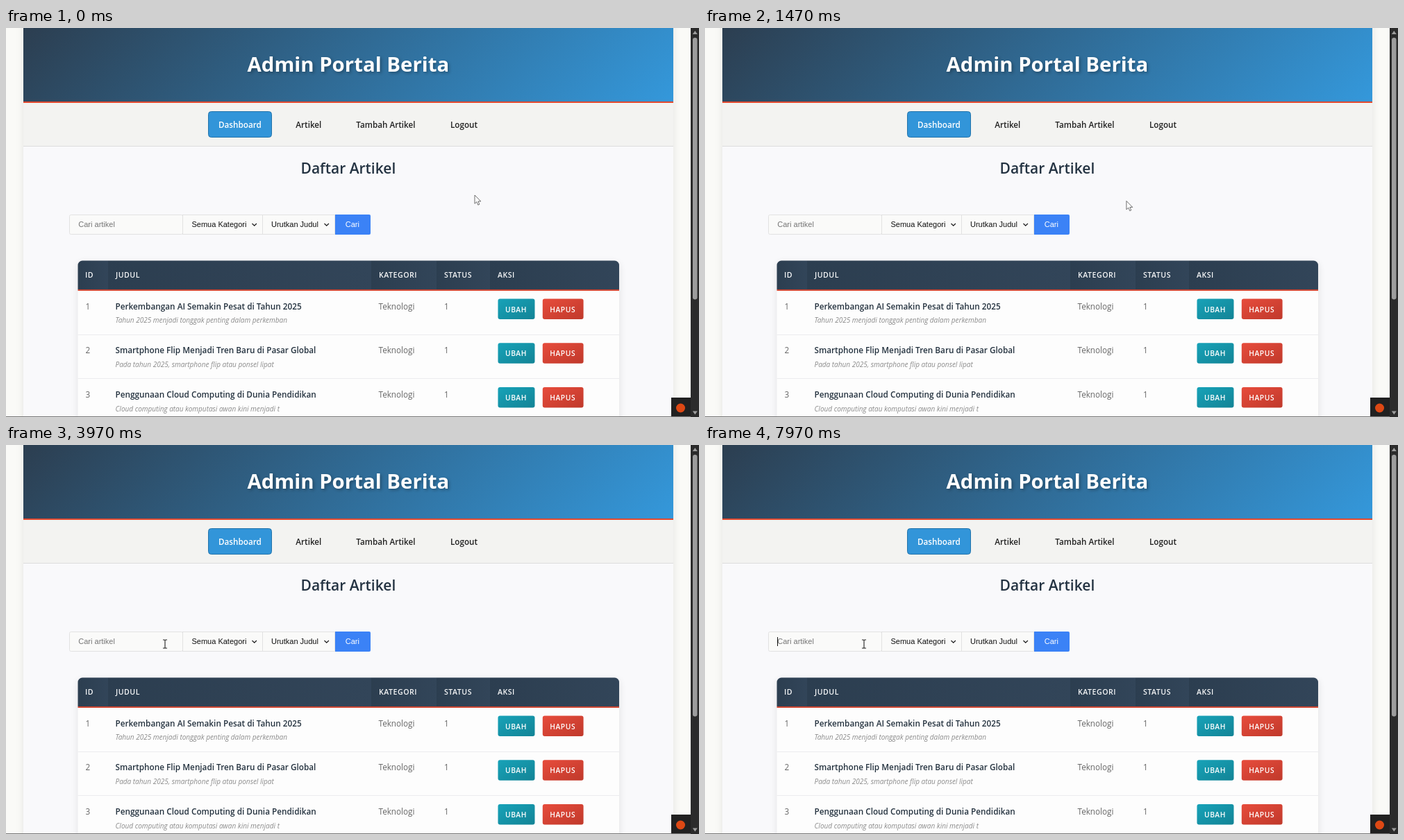
Write an HTML page that moves like this. It is 998 px wide and 561 px high and loops after 8 s.

```html
<!DOCTYPE html>
<html lang="id">
<head>
<meta charset="utf-8">
<title>Admin Portal Berita</title>
<style>
  html, body { margin: 0; height: 100%; overflow: hidden; background: #fafaf7; }
  svg { display: block; width: 100%; height: 100%; }
  text { font-family: "Open Sans", "Noto Sans", sans-serif; font-size: 11.7px; white-space: pre; }
  .brand { font-size: 29.4px; font-weight: 700; fill: #fff; text-shadow: 2px 2px 4px rgba(0,0,0,.3); }
  .heading { font-size: 21px; font-weight: 600; fill: #243342; }
  .nav { font-weight: 600; fill: #222; }
  .active { font-weight: 600; fill: #fff; }
  .th { font-size: 10.6px; font-weight: 600; letter-spacing: .5px; fill: #f6f7f8; }
  .cell { fill: #666; }
  .title { font-size: 11.77px; font-weight: 600; fill: #24323f; }
  .excerpt { font-size: 10px; font-style: italic; fill: #8b8b8b; }
  .btn { font-size: 10.3px; font-weight: 600; letter-spacing: .55px; fill: #fff; }
  .form { font: 11px "Liberation Sans", Arial, sans-serif; fill: #111; }
  .hint { fill: #757575; }
  .light { fill: #fff; }
</style>
</head>
<body>
<svg viewBox="0 0 998 561" preserveAspectRatio="none">
  <defs>
    <linearGradient id="banner" gradientUnits="userSpaceOnUse" x1="233" y1="-208" x2="753" y2="313">
      <stop stop-color="#2c3e50"/><stop offset="1" stop-color="#3498db"/>
    </linearGradient>
    <linearGradient id="head">
      <stop stop-color="#2c3e50"/><stop offset="1" stop-color="#324559"/>
    </linearGradient>
    <linearGradient id="teal" x2="1" y2="1">
      <stop stop-color="#17a2b8"/><stop offset="1" stop-color="#138496"/>
    </linearGradient>
    <linearGradient id="red" x2="1" y2="1">
      <stop stop-color="#e74c3c"/><stop offset="1" stop-color="#c0392b"/>
    </linearGradient>
    <filter id="soft" x="-10%" y="-10%" width="120%" height="120%"><feGaussianBlur stdDeviation="6"/></filter>
    <clipPath id="tableClip"><rect x="103.5" y="335.5" width="779.5" height="260" rx="6.5"/></clipPath>
  </defs>

  <rect width="998" height="561" fill="#fafaf7"/>
  <rect x="25" y="-20" width="936" height="620" opacity=".09" filter="url(#soft)"/>
  <rect x="25" width="936" height="561" fill="#f9f9fb"/>
  <rect x="25" width="936" height="106" fill="url(#banner)"/>
  <rect x="25" y="106" width="936" height="2" fill="#e2492f"/>
  <rect x="25" y="108" width="936" height="62" fill="#f3f3f1"/>
  <rect x="25" y="170" width="936" height="1" fill="#dcdcdc"/>
  <rect x="291.5" y="120.5" width="91" height="37" rx="4" fill="#3295d9" stroke="#2374ab"/>

  <g fill="#fafaf9" stroke="#e2e2e2">
    <rect x="91.5" y="269.5" width="163" height="28" rx="2"/>
    <rect x="254.5" y="269.5" width="115" height="28"/>
    <rect x="369.5" y="269.5" width="104" height="28"/>
  </g>
  <path d="M474 269H523a2 2 0 0 1 2 2v25a2 2 0 0 1-2 2H474z" fill="#3b82f6"/>
  <path d="M354.5 282l3.2 3.2 3.2-3.2M458.5 282l3.2 3.2 3.2-3.2" fill="none" stroke="#222" stroke-width="1.3"/>

  <rect x="104" y="339" width="779" height="260" rx="6" opacity=".1" filter="url(#soft)"/>
  <g id="table" clip-path="url(#tableClip)"></g>
  <g id="labels"></g>

  <rect x="958" y="533" width="28" height="28" fill="#212121"/>
  <circle cx="971.5" cy="548" r="6.5" fill="#dd4814"/>
  <rect x="986" width="12" height="561" fill="#2b2b2b"/>
  <rect x="989" y="14" width="6.5" height="377.5" rx="3.2" fill="#9d9d9d"/>
  <path d="M988.8 9l3.5-5 3.5 5zM988.8 552.5l3.5 5 3.5-5z" fill="#9d9d9d"/>
  <rect y="560" width="986" height="1" fill="#777"/>

  <rect id="caret" x="104" y="277" width="1" height="13" fill="#111"/>
  <path id="arrow" d="M0 0V12.3L2.8 9.7L4.8 14.2L6.8 13.3L4.9 9H8.8Z" fill="#fff" stroke="#4a4a4a" stroke-width=".8"/>
  <path id="beam" d="M-3-6H-1Q0-6 0-5Q0-6 1-6H3M0-5V5M-3 6H-1Q0 6 0 5Q0 6 1 6H3" fill="none" stroke="#222" stroke-width="1.1"/>
</svg>
<script>
const LOOP = 8000, BLINK = 530, CLICK = 3250;
const $ = id => document.getElementById(id);

function add(parent, tag, attrs, content = "") {
  const el = document.createElementNS("http://www.w3.org/2000/svg", tag);
  for (const name in attrs) el.setAttribute(name, attrs[name]);
  el.textContent = content;
  $(parent).append(el);
}
const box = (x, y, width, height, fill, rx = 0) => add("table", "rect", { x, y, width, height, fill, rx });
const label = (x, y, content, style) => add("labels", "text", { x, y, class: style }, content);

label(347.5, 63, "Admin Portal Berita", "brand");
label(306, 144.3, "Dashboard", "active");
label(417.3, 144.3, "Artikel", "nav");
label(504.3, 144.3, "Tambah Artikel", "nav");
label(640, 144.3, "Logout", "nav");
label(424.5, 209.5, "Daftar Artikel", "heading");
label(104.3, 287.4, "Cari artikel", "form hint");
label(267.5, 287.4, "Semua Kategori", "form");
label(382, 287.4, "Urutkan Judul", "form");
label(488.8, 287.4, "Cari", "form light");

box(103, 335, 781, 226, "#fdfdfd");
const columns = [["ID", 103], ["JUDUL", 147], ["KATEGORI", 526], ["STATUS", 620], ["AKSI", 697]];
columns.forEach(([name, x], i) => {
  const end = i < 4 ? columns[i + 1][1] : 884;
  box(x, 335, end - x, 42, "url(#head)");
  label(x + 11, 360.4, name, "th");
});
box(103, 377, 781, 2, "#cf4632");

[
  ["Perkembangan AI Semakin Pesat di Tahun 2025", "Tahun 2025 menjadi tonggak penting dalam perkemban"],
  ["Smartphone Flip Menjadi Tren Baru di Pasar Global", "Pada tahun 2025, smartphone flip atau ponsel lipat"],
  ["Penggunaan Cloud Computing di Dunia Pendidikan", "Cloud computing atau komputasi awan kini menjadi t"]
].forEach(([title, excerpt], i) => {
  const y = 378.5 + i * 63.7;
  box(103, Math.round(y + 63), 781, 1, "#ececee");
  box(708.5, y + 12, 53, 29.5, "url(#teal)", 3);
  box(772.8, y + 12, 58.8, 29.5, "url(#red)", 3);
  label(114.5, y + 27.2, i + 1, "cell");
  label(157.5, y + 27.2, title, "title");
  label(157.5, y + 46.8, excerpt, "excerpt");
  label(536.5, y + 27.2, "Teknologi", "cell");
  label(631, y + 27.2, "1", "cell");
  label(719, y + 31.2, "UBAH", "btn");
  label(783.2, y + 31.2, "HAPUS", "btn");
});

// Pointer stops: time, x, y
const stops = [[1250, 675, 241], [2100, 269, 291.5], [2250, 269, 291.5], [2750, 229, 287]];

function pointerAt(t) {
  const next = stops.findIndex(stop => stop[0] > t);
  if (next === 0) return stops[0].slice(1);
  if (next < 0) return stops[stops.length - 1].slice(1);
  const [t0, x0, y0] = stops[next - 1], [t1, x1, y1] = stops[next];
  const p = (t - t0) / (t1 - t0), e = p * p * (3 - 2 * p);
  return [x0 + (x1 - x0) * e, y0 + (y1 - y0) * e];
}

const show = (el, on) => el.setAttribute("visibility", on ? "visible" : "hidden");

function draw(now) {
  const t = now % LOOP, [x, y] = pointerAt(t);
  const overInput = x < 255;
  for (const el of [$("arrow"), $("beam")]) el.setAttribute("transform", `translate(${x} ${y})`);
  show($("arrow"), !overInput);
  show($("beam"), overInput);
  show($("caret"), t >= CLICK && Math.floor((t - CLICK) / BLINK) % 2 === 0);
  requestAnimationFrame(draw);
}
draw(0);
</script>
</body>
</html>
```
